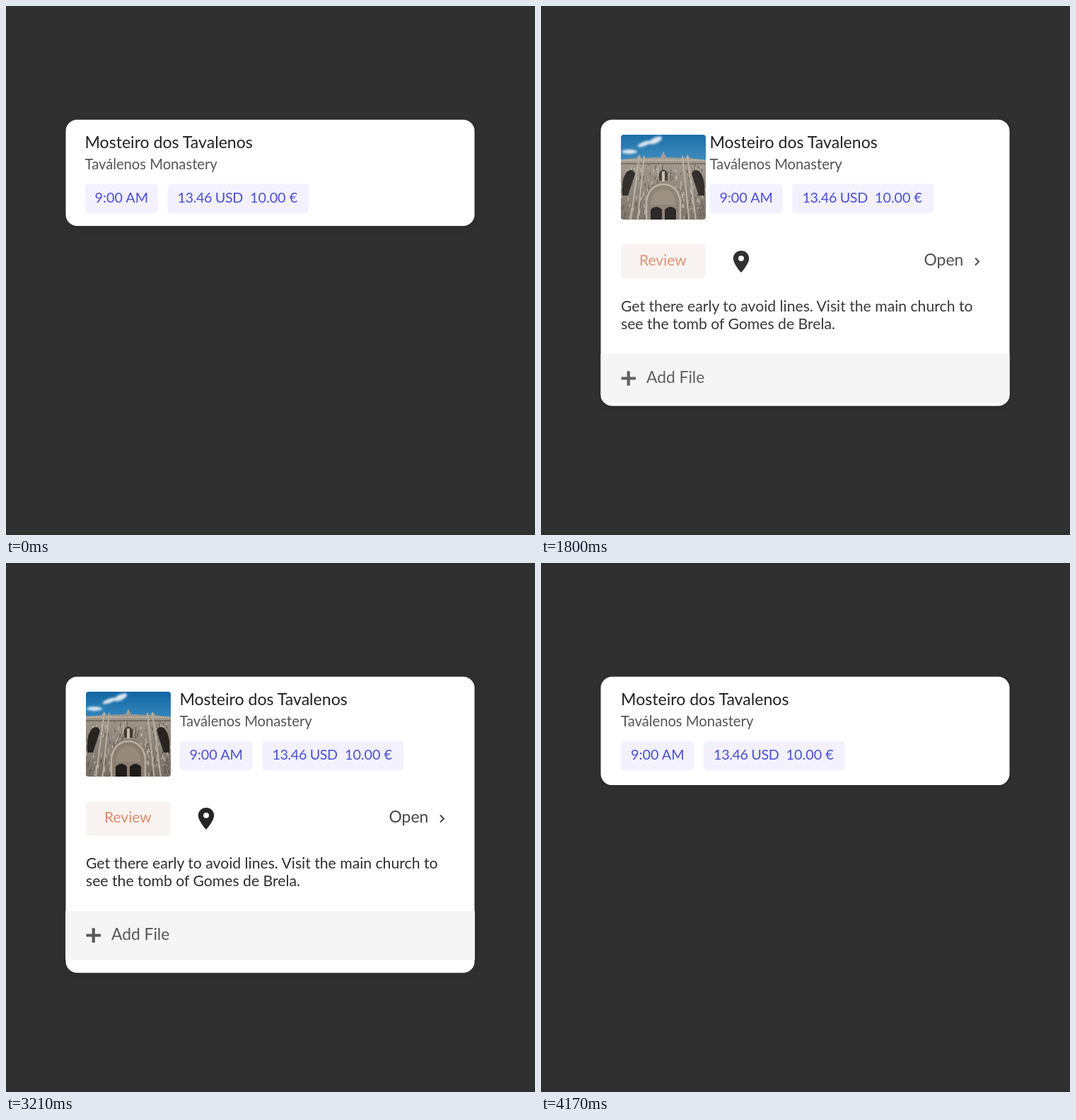
Recreate the animation shown at these times as an HTML page. Size 748x748 px, loop 4950 ms.

```html
<!DOCTYPE html>
<html lang="en">
<head>
<meta charset="utf-8">
<title>Expanding itinerary card</title>
<style>
  html, body { margin: 0; width: 100%; height: 100%; overflow: hidden; background: #303030; }
  svg { display: block; width: 100vw; height: 100vh; font-family: Lato, "Open Sans", sans-serif; }
  #card { fill: #fff; filter: drop-shadow(0 2px 5px rgba(0, 0, 0, .12)); }
  .chip { fill: #f2f1fd; }
  .price { fill: #4b4fd9; font-size: 19.8px; }
  .note { fill: #2b2b2b; font-size: 21.2px; }
  .clouds { fill: #dbe8f0; filter: blur(1.5px); }
</style>
</head>
<body>
<svg viewBox="0 0 748 748">
  <defs>
    <clipPath id="cardClip"><rect id="clip" x="84.5" y="160.7" width="578" rx="16"/></clipPath>
    <clipPath id="photoClip"><rect width="120" height="120" rx="4"/></clipPath>
    <linearGradient id="sky" x2="0" y2="1">
      <stop stop-color="#0f65a3"/><stop offset="1" stop-color="#3488bd"/>
    </linearGradient>
    <linearGradient id="stone" x2="0" y2="1">
      <stop stop-color="#a49b8e"/><stop offset="1" stop-color="#756c62"/>
    </linearGradient>
  </defs>
  <rect width="748" height="748" fill="#303030"/>
  <rect id="card" x="84.5" y="160.7" width="578" rx="16"/>
  <g clip-path="url(#cardClip)">
    <g id="details">
      <g transform="translate(113 182)" clip-path="url(#photoClip)">
        <rect width="120" height="40" fill="url(#sky)"/>
        <g class="clouds">
          <ellipse cx="49" cy="8" rx="10" ry="4" transform="rotate(-25 49 8)"/>
          <ellipse cx="33" cy="13" rx="10" ry="3" transform="rotate(-20 33 13)"/>
          <ellipse cx="12" cy="24" rx="11" ry="3"/>
        </g>
        <path d="M0 35 22 33 26 28 29 33 56 32 60 24 64 32 91 33 94 28 98 33 120 36V120H0Z" fill="url(#stone)"/>
        <path id="shade" fill="none" stroke="#4f473e" stroke-width="1.3" opacity=".7"/>
        <path id="glint" fill="none" stroke="#d2c9bb" stroke-width="1.3" opacity=".75"/>
        <path d="M0 36H120" stroke="#c0b8ab" stroke-width="2" stroke-dasharray="2 1.5"/>
        <path d="M0 41H120" stroke="#655c51" stroke-width="1.5"/>
        <path d="M2 86Q0 62 9 52Q16 47 20 55L10 86Z M118 86Q120 62 111 52Q104 47 100 55L110 86Z" fill="#24211f"/>
        <path id="ribs" fill="none" stroke="#b8afa1" stroke-width="2"/>
        <path d="M35 120V94Q37 69 60 67Q83 69 85 94V120Z" fill="#877c6f"/>
        <path d="M36 120V94Q40 71 60 70Q80 71 84 94V120" fill="none" stroke="#b9af9f" stroke-width="2.5"/>
        <path d="M42 99Q44 78 60 77Q76 78 78 99Z" fill="#95897a"/>
        <path d="M54 65V54Q60 45 66 54V65Z" fill="#3e3831"/>
        <path d="M60 52V66" stroke="#c5bba9" stroke-width="4"/>
        <path d="M42 120V106Q50 98 58 106V120Z M62 120V106Q70 98 78 106V120Z" fill="#1d1a18"/>
      </g>
      <rect x="113" y="337" width="120" height="48.5" rx="6" fill="#f8f3f1"/>
      <text x="139" y="367" font-size="21" fill="#e08c66">Review</text>
      <path transform="translate(263.8 342.9) scale(1.6 1.55)" fill="#222" fill-rule="evenodd"
        d="M12 2C8.1 2 5 5.1 5 9c0 5.3 7 13 7 13s7-7.7 7-13c0-3.9-3.1-7-7-7Zm0 4.5a2.5 2.5 0 1 1 0 5a2.5 2.5 0 1 1 0-5Z"/>
      <text x="541.5" y="367" font-size="22.9" fill="#444">Open</text>
      <path d="M614 356.5 619 361.5 614 366.5" fill="none" stroke="#444" stroke-width="2"/>
      <text class="note" x="113" y="432">Get there early to avoid lines. Visit the main church to</text>
      <text class="note" x="113" y="457">see the tomb of Gomes de Brela.</text>
      <rect x="84" y="492" width="579" height="69" fill="#f5f5f5"/>
      <path d="M113.5 526.5H134M123.7 516.3V536.7" stroke="#555" stroke-width="4.2"/>
      <text x="149" y="532.5" font-size="22.8" fill="#555">Add File</text>
    </g>
    <g id="heading">
      <text y="200.5" font-size="23.1" fill="#222">Mosteiro dos Tavalenos</text>
      <text y="231" font-size="20.2" fill="#555">Taválenos Monastery</text>
      <rect class="chip" y="251.5" width="103" height="41.5" rx="5"/>
      <text class="price" x="14" y="278">9:00 AM</text>
      <rect class="chip" x="117" y="251.5" width="199.5" height="41.5" rx="5"/>
      <text class="price" x="131" y="278" letter-spacing="-.4">13.46 USD</text>
      <text class="price" x="233.5" y="278">10.00 €</text>
    </g>
  </g>
</svg>
<script>
  const $ = id => document.getElementById(id);
  const LOOP = 4950, TICK = 30, TOP = 160.7;
  const OPEN_AT = 1528, CLOSE_AT = 3195.6;
  const RATE = 900; // stage milliseconds per second of spring time
  const lerp = (a, b, p) => a + (b - a) * p;

  // Underdamped spring: stiffness 100, damping 15, mass 1
  function spring(ms) {
    const s = Math.max(0, ms / RATE), decay = 7.5, freq = Math.sqrt(100 - decay * decay);
    return 1 - Math.exp(-decay * s) * (Math.cos(freq * s) + decay / freq * Math.sin(freq * s));
  }

  function openness(t) {
    if (t >= CLOSE_AT) return 1 - spring(t - CLOSE_AT);
    if (t >= OPEN_AT) return spring(t - OPEN_AT);
    // The loop opens on a pause near the end of the closing spring.
    const settling = t < 480 ? 3780 : t + 3330;
    return 1 - spring(settling - CLOSE_AT);
  }

  function render(t) {
    const p = openness(Math.floor(t / TICK) * TICK);
    const height = lerp(314, 582.7, p) - TOP;
    $('card').setAttribute('height', height);
    $('clip').setAttribute('height', height);
    $('details').setAttribute('opacity', Math.min(1, Math.max(0, p)));
    $('heading').setAttribute('transform', `translate(${lerp(113, 247, p)} 0)`);
  }

  // Carved stonework: short strokes that spread outwards towards the ground
  let seed = 7;
  const random = () => (seed = seed * 16807 % 2147483647) / 2147483647;
  function carving(count) {
    let path = '';
    for (let i = 0; i < count; i++) {
      const lean = (random() - .5) * 1.1, y = 42 + random() * 74, length = 2 + random() * 6;
      const x = 60 + lean * (80 + y * .4);
      path += `M${x} ${y}l${lean * length * .4} ${length}`;
    }
    return path;
  }
  $('shade').setAttribute('d', carving(130));
  $('glint').setAttribute('d', carving(130));
  $('ribs').setAttribute('d', [-34, -27, 27, 34]
    .map(x => `M${60 + x} 30L${60 + x * 1.35} 120`).join(''));

  const start = performance.now();
  function frame() {
    render((performance.now() - start) % LOOP);
    requestAnimationFrame(frame);
  }
  frame();
</script>
</body>
</html>
```
